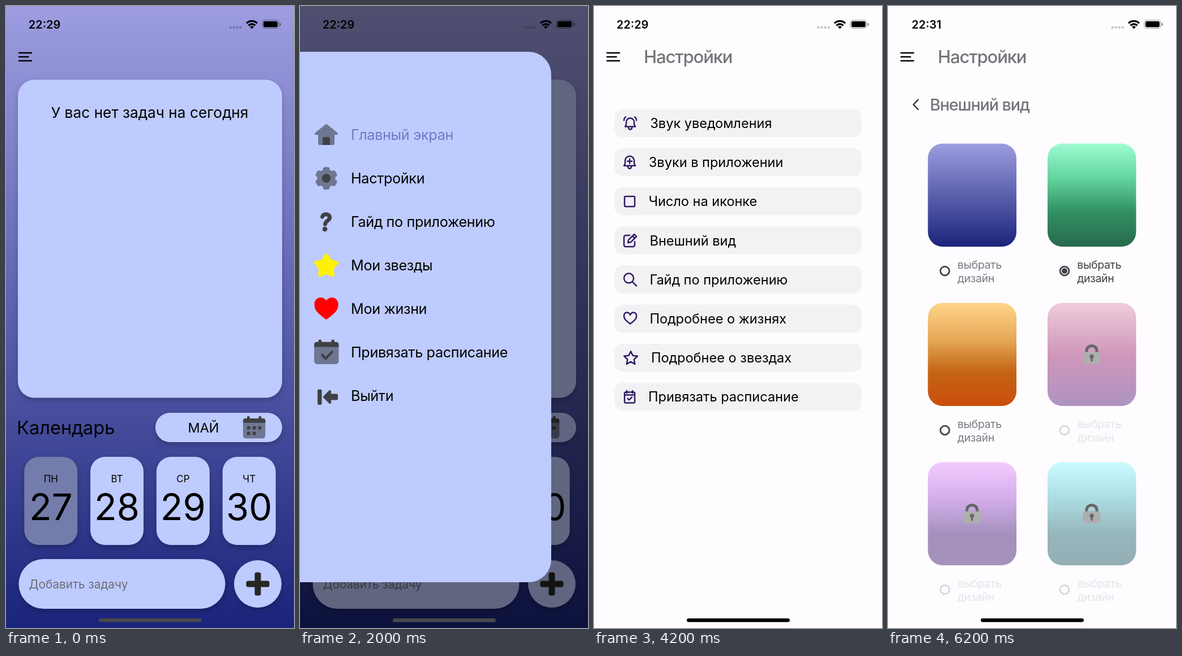
These frames come from a looping animation (509x1101 px, 7600 ms). An HTML page:

```html
<!DOCTYPE html>
<html lang="ru">
<head>
<meta charset="utf-8">
<style>
html, body { margin: 0; width: 100%; height: 100%; overflow: hidden; background: #fefcff; }
svg { display: block; width: 100%; height: 100%; font-family: Inter, "Noto Sans", sans-serif; }
.card { fill: #becbff; filter: drop-shadow(0 4px 4px rgba(0, 0, 0, .22)); }
.line { fill: none; stroke: #301a63; stroke-width: 2.5; stroke-linecap: round; stroke-linejoin: round; }
.gray { fill: #6f7692; }
.dark { fill: #404144; }
.head { fill: #757478; font-weight: 500; letter-spacing: -1.1px; }
</style>
</head>
<body>
<svg id="stage" viewBox="0 0 509 1101"></svg>
<script>
const LOOP = 7600, W = 509, DRAWER = 444;
const stage = document.getElementById('stage');

const rect = (x, y, w, h, r, attrs = '') =>
  `<rect x="${x}" y="${y}" width="${w}" height="${h}" rx="${r}" ${attrs}/>`;
const circle = (x, y, r, attrs = '') => `<circle cx="${x}" cy="${y}" r="${r}" ${attrs}/>`;
const path = (d, attrs = '') => `<path d="${d}" ${attrs}/>`;
const text = (x, y, size, str, attrs = '') =>
  `<text x="${x}" y="${y}" font-size="${size}" ${attrs}>${str}</text>`;
const at = (x, y, body, scale = 1) =>
  `<g transform="translate(${x} ${y}) scale(${scale})">${body}</g>`;
const middle = 'text-anchor="middle"';

function gradient(id, stops) {
  const list = stops.map(([o, c]) => `<stop offset="${o}" stop-color="${c}"/>`).join('');
  return `<linearGradient id="${id}" x1="0" y1="0" x2="0" y2="1">${list}</linearGradient>`;
}

function starPath(cx, cy, outer, inner) {
  let d = '';
  for (let i = 0; i < 10; i++) {
    const r = i % 2 ? inner : outer, a = i * Math.PI / 5;
    d += `${i ? 'L' : 'M'}${(cx + r * Math.sin(a)).toFixed(2)} ${(cy - r * Math.cos(a)).toFixed(2)}`;
  }
  return d + 'Z';
}

const HEART = 'M12 21C4 15 1 12 1 7.5A5.5 5.5 0 0 1 12 5.5A5.5 5.5 0 0 1 23 7.5C23 12 20 15 12 21Z';

const themes = [
  [[0, '#9d9de0'], [1, '#1a247a']],
  [[0, '#9ffcd2'], [.35, '#60d29c'], [.65, '#329264'], [1, '#28694c']],
  [[0, '#ffd48a'], [.35, '#e6aa58'], [.67, '#c46414'], [1, '#cb4e0c']],
  [[0, '#f0ccda'], [.5, '#cf97ba'], [1, '#ae93c2']],
  [[0, '#f1cbff'], [.35, '#d4aeea'], [.7, '#a391bd'], [1, '#a592ba']],
  [[0, '#cafbff'], [.35, '#abdde2'], [.7, '#96b6bc'], [1, '#93afb5']]
];

// Calendar body shared by the month button and the menu, 40 units wide.
const calendar = inner =>
  rect(0, 4, 40, 36, 5, 'class="gray"') +
  path('M0 12V8a4 4 0 0 1 4-4H36a4 4 0 0 1 4 4V12Z', 'class="dark"') +
  rect(7, 0, 5, 8, 2, 'class="dark"') + rect(28, 0, 5, 8, 2, 'class="dark"') + inner;

function home() {
  const dots = [[7, 18], [17, 18], [27, 18], [7, 28], [17, 28]]
    .map(([x, y]) => rect(x, y, 6, 6, 1.5, 'class="dark"')).join('');
  const days = ['ПН', 'ВТ', 'СР', 'ЧТ'].map((name, i) => {
    const x = 32.3 + i * 116.8;
    return rect(x, 798, 94, 156, 26, `class="card" ${i ? '' : 'style="fill:#737cab"'}`) +
      text(x + 47, 843, 17, name, middle) + text(x + 47, 910, 65.2, 27 + i, middle);
  }).join('');
  return rect(0, 0, W, 1101, 0, 'fill="url(#theme0)"') +
    rect(21, 130.5, 467, 563, 29, 'class="card"') +
    text(254, 197.5, 26.3, 'У вас нет задач на сегодня', middle) +
    text(19, 758, 32.6, 'Календарь') +
    rect(264, 720, 224, 52, 26, 'class="card"') +
    text(349, 754.5, 23.5, 'МАЙ', middle) +
    at(419, 726, calendar(dots), .985) + days +
    rect(22.5, 979, 365, 88, 44, 'class="card"') +
    text(40.5, 1030.5, 20.8, 'Добавить задачу', 'fill="#6b6d78"') +
    circle(445, 1023, 42, 'class="card"') +
    rect(424.5, 1017.5, 41, 11, 3.5, 'fill="#262626"') +
    rect(439.5, 1002.5, 11, 41, 3.5, 'fill="#262626"');
}

function settings() {
  const rows = [
    ['Звук уведомления', 99.3, 52, 'M12 3a7 7 0 0 0-7 7v4l-2 4h18l-2-4v-4a7 7 0 0 0-7-7zM9 20a3 3 0 0 0 6 0M4 1Q1 3 1 7M20 1Q23 3 23 7'],
    ['Звуки в приложении', 96.8, 52, 'M11 1a8 8 0 0 0-8 8v5l-2 4h20l-2-4V9a8 8 0 0 0-8-8zM8 20a3 3 0 0 0 6 0M11 6v8M7 10h8'],
    ['Число на иконке', 96.4, 52, 'M4 3H18a2 2 0 0 1 2 2V19a2 2 0 0 1-2 2H4a2 2 0 0 1-2-2V5a2 2 0 0 1 2-2Z'],
    ['Внешний вид', 98.5, 52, 'M11 3H4a3 3 0 0 0-3 3V20a3 3 0 0 0 3 3H17a3 3 0 0 0 3-3V14M8 16l1-5L19 1l4 4L13 15zM16 4l4 4'],
    ['Гайд по приложению', 98.5, 52, 'M1 9.5a8.5 8.5 0 1 0 17 0a8.5 8.5 0 1 0-17 0M16 16l7 7'],
    ['Подробнее о жизнях', 98.5, 52, HEART],
    ['Подробнее о звездах', 101, 53, starPath(12, 13, 12.5, 6)],
    ['Привязать расписание', 96, 52, 'M4 3.5H18a2 2 0 0 1 2 2V20.5a2 2 0 0 1-2 2H4a2 2 0 0 1-2-2V5.5a2 2 0 0 1 2-2ZM2 8.5H20M6 1v4M16 1v4M7.5 15l2.5 2.5 5-5']
  ];
  return rect(0, 0, W, 1101, 0, 'fill="#fefcff"') + rows.map(([label, x, ix, d], i) => {
    const y = 182.5 + i * 69.2;
    return rect(36.5, y, 436, 49.5, 14, 'fill="#f2f1f4"') +
      at(ix, y + 13, path(d, 'class="line"')) + text(x, y + 33.5, 23.55, label);
  }).join('');
}

function lock(x, y) {
  return path(`M${x - 9} ${y + 89}V${y + 84}a9 8 0 0 1 18 0V${y + 89}`,
      'fill="none" stroke="#666" stroke-width="5"') +
    rect(x - 15.5, y + 87, 31, 21, 4, 'fill="#aeaeae"') +
    circle(x, y + 95, 3.7, 'fill="#666"') + rect(x - 1.7, y + 95, 3.4, 9, 1.7, 'fill="#666"');
}

function looks(chosen) {
  const cards = themes.map((_, i) => {
    const x = 70.5 + i % 2 * 211.5, y = 243.5 + (i >> 1) * 282, locked = i > 2, on = i === chosen;
    const ring = locked ? '#d8d7db' : '#434246';
    const ink = locked ? '#e5e4e8' : on ? '#434246' : '#7c7b80';
    const label = (s, dy) => text(x + 52.3, y + dy, 19.6, s, `fill="${ink}" letter-spacing="-.4"`);
    return rect(x, y, 156.5, 182.5, 26, `fill="url(#theme${i})"`) +
      (locked ? lock(x + 78, y) : '') +
      circle(x + 30, y + 225.5, 7.9, `fill="none" stroke="${ring}" stroke-width="2.8"`) +
      (on ? circle(x + 30, y + 225.5, 5, `fill="${ring}"`) : '') +
      label('выбрать', 221.5) + label('дизайн', 245);
  }).join('');
  return rect(0, 0, W, 1101, 0, 'fill="#fefcff"') +
    path('M53 166L45 174.5L53 183', 'class="line" style="stroke:#333"') +
    text(74, 184.5, 28.7, 'Внешний вид', 'class="head"') + cards;
}

function drawer(active) {
  const labels = ['Главный экран', 'Настройки', 'Гайд по приложению', 'Мои звезды',
    'Мои жизни', 'Привязать расписание', 'Выйти'];
  const teeth = [0, 60, 120].map(a =>
    rect(40.5, 285, 12, 40, 4, `class="gray" transform="rotate(${a} 46.5 305)"`)).join('');
  const check = path('M13 25l6 6 10-11',
    'fill="none" stroke="#404144" stroke-width="4" stroke-linecap="round" stroke-linejoin="round"');
  const icons =
    path('M28 226L46.5 211L65 226H59V244H34V226Z',
      'class="gray" stroke="#6f7692" stroke-width="4" stroke-linejoin="round"') +
    path('M40 246V235a3 3 0 0 1 3-3h7a3 3 0 0 1 3 3V246Z', 'class="dark"') +
    teeth + circle(46.5, 305, 16, 'class="gray"') + circle(46.5, 305, 7.7, 'class="dark"') +
    path('M39.5 373C41 367 52.5 367 52.5 374.5C52.5 380 45 380 44.5 386',
      'fill="none" stroke="#404144" stroke-width="7" stroke-linecap="round"') +
    circle(44, 395, 4.4, 'class="dark"') +
    path(starPath(46.5, 460.5, 19.5, 11),
      'fill="#fff200" stroke="#fff200" stroke-width="6" stroke-linejoin="round"') +
    at(25.5, 516.3, path(HEART,
      'fill="#f00" stroke="#f00" stroke-width="2" stroke-linejoin="round"'), 1.75) +
    at(25, 590.5, calendar(check), 1.085) +
    rect(31, 678.5, 7.5, 27.5, 3, 'class="dark"') +
    path('M43 692L53 682V688.5H65V695.5H53V702Z',
      'class="dark" stroke="#404144" stroke-width="4" stroke-linejoin="round"');
  return path('M0 81H404a40 40 0 0 1 40 40V980a40 40 0 0 1-40 40H0Z', 'fill="#becbff"') + icons +
    labels.map((s, i) => text(90, 237 + i * 77, 25.2, s,
      `letter-spacing="-.35" fill="${i === active ? '#7478c6' : '#000'}"`)).join('');
}

function statusBar(clock, barColor) {
  let dots = '';
  for (let i = 0; i < 4; i++) dots += circle(396.6 + i * 6, 38, 2.2, 'opacity=".22"');
  const wifi = 'fill="none" stroke="#000" stroke-width="3.3"';
  return text(68, 40, 20, clock, middle + ' font-weight="600"') + dots +
    path('M425 30.5a13.5 13.5 0 0 1 19 0M428.5 34.5a8.5 8.5 0 0 1 12 0', wifi) +
    path('M434.5 40.5L431 37a5 5 0 0 1 7 0Z') +
    rect(453, 25, 29, 14.5, 4.5, 'fill="none" stroke="#000" stroke-opacity=".4" stroke-width="1.2"') +
    rect(455, 27, 25, 10.5, 2.8) + path('M483.5 30a2.5 2.5 0 0 1 0 5Z', 'opacity=".45"') +
    rect(164, 1084, 182, 6.6, 3.3, `fill="${barColor}"`);
}

const menuButton = path('M23 83H45M23 90H39.5M23 97H45', 'class="line" style="stroke:#000"');
const title = text(88, 101, 31, 'Настройки', 'class="head"');

stage.innerHTML = '<defs>' + themes.map((s, i) => gradient('theme' + i, s)).join('') + '</defs>' +
  `<g id="home">${home()}</g>
  <g id="settings">${settings()}${rect(0, 0, W, 1101, 0, 'id="dim"')}</g>
  <g id="looks0">${looks(0)}</g><g id="looks1">${looks(1)}</g>
  <g id="title">${title}</g>${menuButton}
  ${rect(0, 0, W, 1101, 0, 'id="shade"')}
  <g id="drawer0">${drawer(0)}</g><g id="drawer1">${drawer(1)}</g>
  <g id="status0">${statusBar('22:29', '#49494d')}</g>
  <g id="status1">${statusBar('22:29', '#000')}</g>
  <g id="status2">${statusBar('22:31', '#000')}</g>`;

const el = id => document.getElementById(id);
const show = (id, on) => el(id).style.display = on ? '' : 'none';
const move = (id, x) => el(id).setAttribute('transform', `translate(${x.toFixed(2)} 0)`);

// Critically damped spring from 0 to 1, started at the given time.
function spring(t, start) {
  const s = Math.max(0, t - start) * .01826;
  return 1 - Math.exp(-s) * (1 + s);
}

function draw(now) {
  const t = Math.floor(now % LOOP / 100) * 100;
  const onHome = t < 3200, late = t >= 6200;
  const open = onHome ? spring(t, 1046.5) : 1 - spring(t, 3261.5);
  const push = spring(t, 4616);

  show('home', onHome);
  show('settings', !onHome && push < .999);
  show('title', !onHome);
  show('looks0', push > 0 && !late);
  show('looks1', late);
  move('settings', -.3 * W * push);
  move('looks0', W * (1 - push));
  el('dim').setAttribute('opacity', .1 * push);

  el('shade').setAttribute('opacity', .5 * open);
  show('drawer0', onHome && open > 0);
  show('drawer1', !onHome && open > .001);
  move('drawer0', DRAWER * (open - 1));
  move('drawer1', DRAWER * (open - 1));

  show('status0', onHome);
  show('status1', !onHome && !late);
  show('status2', late);
}

const begin = performance.now();
function tick() {
  draw(performance.now() - begin);
  requestAnimationFrame(tick);
}
tick();
</script>
</body>
</html>
```
